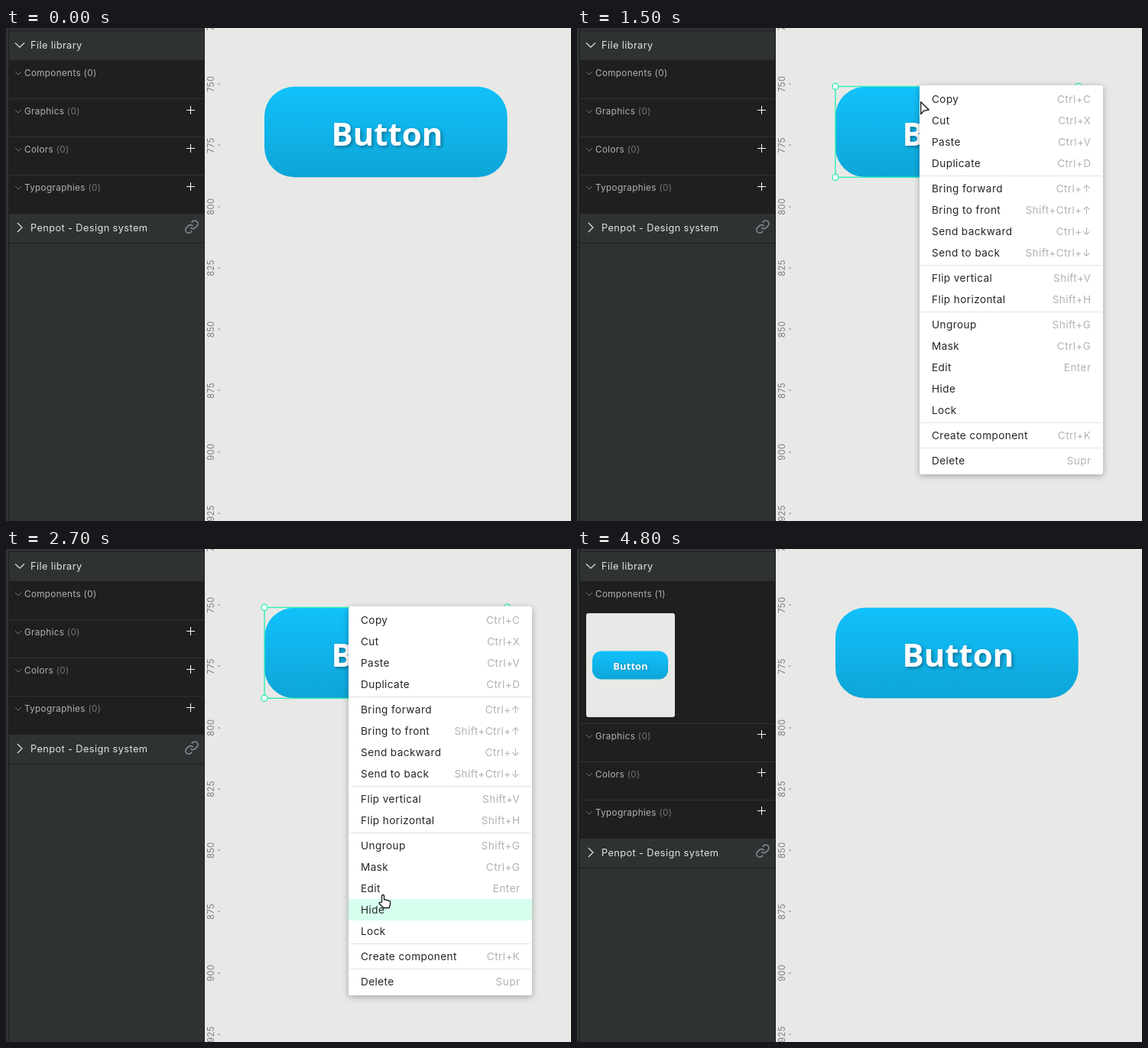
These frames come from a looping animation (739x645 px, 5600 ms). An HTML page with a canvas:

```html
<!DOCTYPE html>
<html lang="en">
<head>
<meta charset="utf-8">
<title>Create a component</title>
<style>
  html, body { margin: 0; width: 100%; height: 100%; overflow: hidden; background: #e8e9e6; }
  canvas { display: block; }
</style>
</head>
<body>
<canvas id="stage" width="739" height="645"></canvas>
<script>
const ctx = document.getElementById('stage').getContext('2d');
const LOOP = 5600;
const CANVAS = '#e8e9e6', PANEL = '#2e3233', DARK = '#1f1f1e';
const LIGHT = '#e3e3e3', GREY = '#b1b2b5', DIM = '#74767a';
const GREEN = '#31efb8', CYAN = '#25e2ee';

const MENU = [
  [['Copy', 'Ctrl+C'], ['Cut', 'Ctrl+X'], ['Paste', 'Ctrl+V'], ['Duplicate', 'Ctrl+D']],
  [['Bring forward', 'Ctrl+↑'], ['Bring to front', 'Shift+Ctrl+↑'],
   ['Send backward', 'Ctrl+↓'], ['Send to back', 'Shift+Ctrl+↓']],
  [['Flip vertical', 'Shift+V'], ['Flip horizontal', 'Shift+H']],
  [['Ungroup', 'Shift+G'], ['Mask', 'Ctrl+G'], ['Edit', 'Enter'], ['Hide', ''], ['Lock', '']],
  [['Create component', 'Ctrl+K']],
  [['Delete', 'Supr']]
];

const LINK = new Path2D('M10 13a5 5 0 0 0 7.54.54l3-3a5 5 0 0 0-7.07-7.07l-1.72 1.71' +
  'M14 11a5 5 0 0 0-7.54-.54l-3 3a5 5 0 0 0 7.07 7.07l1.71-1.71');
const ARROW = new Path2D('M.7.7V16.8L4.7 12.3L11.2 11Z');
const HAND = new Path2D('M4.5 10V2a1.5 1.5 0 0 1 3 0v5q2.2-.9 3 .5q2-.5 2.7.8' +
  'q2.3-.3 2.3 1.7v3l-1.5 4.5h-7.5l-5.5-6q.3-2 2-1z');

// Pointer heights at 100 ms intervals while it travels down the menu.
const DESCENT = [92, 110, 160, 235, 320, 395, 452, 490, 512, 524, 531, 534];

function rect(x, y, w, h, color) {
  ctx.fillStyle = color;
  ctx.fillRect(x, y, w, h);
}

function round(x, y, w, h, r, fill) {
  ctx.beginPath();
  ctx.roundRect(x, y, w, h, r);
  ctx.fillStyle = fill;
  ctx.fill();
}

function line(points, color, width = 1) {
  ctx.beginPath();
  points.forEach(([x, y]) => ctx.lineTo(x, y));
  ctx.strokeStyle = color;
  ctx.lineWidth = width;
  ctx.stroke();
}

function text(str, x, y, size, color, align = 'left') {
  const spacing = size * 0.03;
  ctx.font = `400 ${size}px Inter, sans-serif`;
  ctx.letterSpacing = spacing + 'px';
  ctx.textAlign = align;
  ctx.fillStyle = color;
  ctx.fillText(str, align === 'right' ? x + spacing : x, y);
  return ctx.measureText(str).width;
}

function at(x, y, scale, draw) {
  ctx.save();
  ctx.translate(x, y);
  ctx.scale(scale, scale);
  draw();
  ctx.restore();
}

function button(x, y, scale) {
  at(x, y, scale, () => {
    const fill = ctx.createLinearGradient(0, 0, 0, 118.5);
    fill.addColorStop(0, '#11c1fb');
    fill.addColorStop(1, '#0ea5d8');
    round(0, 0, 317.7, 118.5, 39, fill);
    ctx.font = '700 42px "Open Sans", sans-serif';
    ctx.letterSpacing = '0px';
    ctx.textAlign = 'left';
    ctx.shadowColor = 'rgba(0,0,0,.35)';
    ctx.shadowOffsetX = ctx.shadowOffsetY = 2 * scale;
    ctx.shadowBlur = 4 * scale;
    ctx.fillStyle = '#fff';
    ctx.fillText('Button', 87.5, 77.5);
  });
}

function ruler() {
  for (let i = -1; i < 8; i++) {
    const y = 73.2 + i * 80.25;
    rect(277, Math.round(y) - 0.5, 3, 1, '#85878a');
    ctx.save();
    ctx.translate(272, y);
    ctx.rotate(-Math.PI / 2);
    text(String(750 + i * 25), 0, 0, 11.3, '#7b7d81', 'center');
    ctx.restore();
  }
}

function section(name, count, y, countColor, plus) {
  line([[12, y - 2], [16, y + 2], [20, y - 2]], '#74767a');
  const w = text(name + ' ', 24, y + 4, 11.7, GREY);
  text(`(${count})`, 24 + w, y + 4, 11.7, countColor);
  if (plus) {
    rect(236, plus, 11, 1, '#fff');
    rect(241, plus - 5, 1, 11, '#fff');
  }
}

function sidebar(created) {
  const shift = created ? 136 : 0;
  const iconShift = created ? 135 : 0;
  rect(0, 0, 260, 645, PANEL);
  rect(4, 3, 256, 1, DARK);
  rect(4, 42, 256, 201 + shift, DARK);
  rect(4, 281 + shift, 256, 1, DARK);
  rect(3, 0, 1, 645, DARK);
  rect(259, 0, 1, 645, DARK);

  line([[12, 19.5], [18, 25.2], [24, 19.5]], LIGHT, 1.2);
  text('File library', 32, 27, 12.8, LIGHT);
  section('Components', created ? 1 : 0, 59, GREY);
  ['Graphics', 'Colors', 'Typographies'].forEach((name, i) => {
    rect(4, 92 + 50 * i + shift, 255, 1, '#303334');
    section(name, 0, 109 + 50 * i + shift, DIM, 107 + 50 * i + iconShift);
  });

  line([[15, 255 + shift], [21, 261 + shift], [15, 267 + shift]], LIGHT, 1.2);
  text('Penpot - Design system', 32, 266 + shift, 12.8, LIGHT);
  at(233.2, 250.4 + iconShift, 0.81, () => {
    ctx.strokeStyle = '#85878b';
    ctx.lineWidth = 2.1;
    ctx.stroke(LINK);
  });

  if (created) {
    round(12, 84, 116, 136, 3, CANVAS);
    button(20, 133.5, 0.312);
  }
}

function outline(color, selected) {
  const [x, y, w, h] = [338, 76.5, 317.7, 118.8];
  ctx.strokeStyle = color;
  ctx.lineWidth = selected ? 1.4 : 1;
  ctx.strokeRect(x, y, w, h);
  if (!selected) return;
  for (const cx of [x, x + w]) {
    for (const cy of [y, y + h]) {
      ctx.beginPath();
      ctx.arc(cx, cy, 4, 0, Math.PI * 2);
      ctx.fillStyle = '#fff';
      ctx.fill();
      ctx.stroke();
    }
  }
}

function menu(pointerY) {
  ctx.save();
  ctx.shadowColor = 'rgba(0,0,0,.3)';
  ctx.shadowBlur = 8;
  ctx.shadowOffsetY = 2;
  round(448, 75, 240, 509, 3, '#fff');
  ctx.restore();

  let y = 79;
  MENU.forEach((group, i) => {
    if (i) {
      rect(450, y + 2, 236, 1, '#e3e3e3');
      y += 5;
    }
    for (const [label, keys] of group) {
      if (pointerY >= y && pointerY < y + 28) rect(448, y, 240, 28, '#d6ffee');
      text(label, 464, y + 19, 13.6, '#222526');
      text(keys, 672, y + 19, 13.6, GREY, 'right');
      y += 28;
    }
  });
}

function pointer(shape, x, y) {
  at(x, y, 1, () => {
    ctx.lineJoin = 'round';
    ctx.lineWidth = 1.3;
    ctx.fillStyle = '#fff';
    ctx.strokeStyle = '#161616';
    ctx.fill(shape);
    ctx.stroke(shape);
  });
}

function handPosition(t) {
  if (t < 2100) return [442, 91];
  const step = Math.min(Math.floor((t - 2100) / 100), DESCENT.length - 1);
  const y = DESCENT[step];
  return [445.5 + 47 * ((y - 92) / 442) ** 0.6, y];
}

function render(t) {
  const created = t >= 4000;
  rect(0, 0, 739, 645, CANVAS);
  ruler();
  sidebar(created);
  button(338, 76.7, 1);

  if (t >= 1000 && t < 1500) outline(GREEN, false);
  if (t >= 1500 && t < 4000) outline(GREEN, true);
  if (created && t < 4800) outline(CYAN, true);

  const [handX, handY] = handPosition(t);
  if (t >= 1500 && t < 4000) menu(t < 1600 ? -1 : handY + 8);

  if (t >= 900 && t < 1000) pointer(ARROW, 452, 10);
  else if (t >= 1000 && t < 1400) pointer(ARROW, 450, 92);
  else if (t >= 1400 && t < 1600) pointer(ARROW, 449, 96);
  else if (t >= 1600 && t < 3500) pointer(HAND, handX, handY);
}

const start = performance.now();
function tick() {
  render((performance.now() - start) % LOOP);
  requestAnimationFrame(tick);
}
tick();
</script>
</body>
</html>
```
